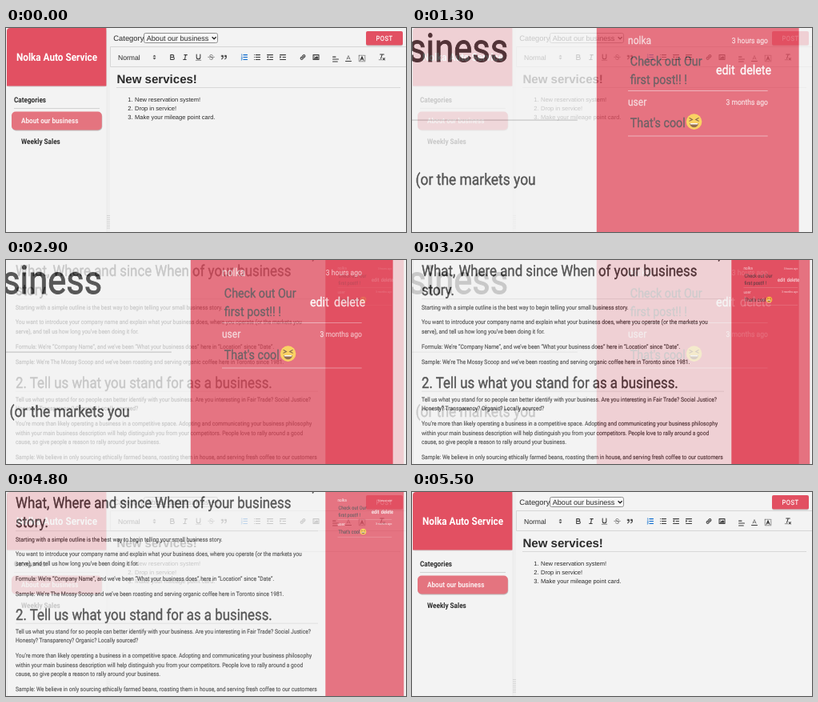
An HTML page for the animation above (5.72 s loop, 500 by 255 pixels).

```html
<!DOCTYPE html>
<html lang="en">
<head>
<meta charset="utf-8">
<title>Business page editor</title>
<style>
  html, body { margin: 0; width: 100%; height: 100%; overflow: hidden; background: #f3f3f3; }
  svg { display: block; width: 100vw; height: 100vh; color: #2b2b2b; }
  text { text-rendering: geometricPrecision; fill: currentColor; }
  .narrow { font-family: Roboto, sans-serif; stroke: currentColor; stroke-width: .02em; }
  .narrow[font-weight] { stroke: none; }
  .plain { font-family: "Liberation Sans", Arial, sans-serif; }
  .icon { fill: none; stroke: #3a3a3a; stroke-width: 1.8; stroke-linecap: round; stroke-linejoin: round; }
  .icon .solid { fill: #3a3a3a; stroke-width: 1; }
  .icon .thin { stroke-width: 1; }
  .icon.active { stroke: #06c; }
</style>
</head>
<body>
<svg id="stage" viewBox="0 0 500 255" preserveAspectRatio="none"></svg>
<script>
const RED = '#e25062', PAPER = '#f3f3f3';
const CONDENSED = 0.885;

const narrow = (x, y, size, str, attrs = '') =>
  `<text class="narrow" transform="translate(${x} ${y}) scale(${CONDENSED} 1)" font-size="${size}" ${attrs}>${str}</text>`;
const plain = (x, y, size, str, attrs = '') =>
  `<text class="plain" x="${x}" y="${y}" font-size="${size}" ${attrs}>${str}</text>`;
const rect = (x, y, w, h, fill, attrs = '') =>
  `<rect x="${x}" y="${y}" width="${w}" height="${h}" fill="${fill}" ${attrs}/>`;
const line = (d, stroke, width = 1) =>
  `<path d="${d}" fill="none" stroke="${stroke}" stroke-width="${width}"/>`;
const path = (d, cls = '') => `<path d="${d}" class="${cls}"/>`;
const icon = (cx, cy, body, cls = '') =>
  `<g class="icon ${cls}" transform="translate(${cx - 5.2} ${cy - 5.2}) scale(.58)">${body}</g>`;

const toolbar = [
  [185.5, path('M7 11l2 2.5 2-2.5zM7 7l2-2.5L11 7z', 'solid')],
  [208, path('M5 4H9.5a2.5 2.5 0 0 1 0 5H5zM5 9h5.5a2.5 2.5 0 0 1 0 5H5z')],
  [224, path('M7 4h6M5 14h6M8 14l2-10')],
  [240.5, path('M5 3v6a4 4 0 0 0 8 0V3') + path('M3.5 15.5h11', 'thin')],
  [256.5, path('M12.5 5.5C11 3 6 3 6 6c0 2.8 6.5 2.6 6.5 5.6 0 3.4-5.8 3-7.3.6', 'thin') + path('M2.5 8.7h13', 'thin')],
  [272.5, path('M4 5h3v3H4zM11 5h3v3h-3z', 'solid') + path('M7 8c0 4-3 5-3 5M14 8c0 4-3 5-3 5')],
  [298, path('M7 4h8M7 9h8M7 14h8') + path('M2.5 3.2l1-.7V6M2.4 8h1.8l-1.8 2.5h2M2.4 12.5h1.8l-1 1.4c1.4 0 1.2 1.9-.8 1.5', 'thin'), 'active'],
  [314, path('M6 4h9M6 9h9M6 14h9M3 4h0M3 9h0M3 14h0')],
  [330, path('M3 14h12M3 4h12M9 9h6') + path('M5 7v4L3 9z', 'solid')],
  [346, path('M3 14h12M3 4h12M9 9h6') + path('M3 7v4l2-2z', 'solid')],
  [371, path('M7 11l4-4M8 6.5l2-2a2.5 2.5 0 0 1 3.5 3.5l-2 2M10 11.5l-2 2A2.5 2.5 0 0 1 4.5 10l2-2')],
  [387.5, path('M3 4h12v10H3z') + path('M5 12v-1l2-2 1 1 3-3 2 2v3zM5.5 7h1', 'solid')],
  [412, path('M15 9H3M13 14H3M9 4H3'), '', 2.5],
  [428, path('M3 15h12') + path('M5.5 11L9 3l3.5 8M6.4 9h5.2', 'thin'), '', 1.5],
  [445, path('M5.5 13L9 5l3.5 8M6.4 10.5h5.2') +
        '<path class="thin" d="M2.5 2.5h13v13h-13z" stroke-dasharray="1 1.6"/>', '', 1.5],
  [470, path('M5 3h8M9.3 3L6.5 12M11 11l4 4M15 11l-4 4') + path('M2.5 14.5h6', 'thin')]
].map(([x, body, cls = '', dy = 0]) => icon(x, 36.5 + dy, body, cls)).join('');

const listItems = ['New reservation system!', 'Drop in service!', 'Make your mileage point card.']
  .map((item, i) => {
    const y = 92.4 + i * 10.6;
    return plain(158.5, y, 7.5, `${i + 1}.`, 'text-anchor="end"') + plain(161, y, 7.5, item);
  }).join('');

const bold = 'font-weight="700"';
const editor = `
  ${rect(0, 0, 500, 255, PAPER)}
  ${rect(1, 1.5, 125, 72, '#000', 'opacity=".15" rx="3"')}
  <path d="M1 72.5V4a4 4 0 0 1 4-4H125.5V72.5z" fill="${RED}"/>
  ${narrow(63.5, 40.5, 13.3, 'Nolka Auto Service', `${bold} text-anchor="middle" color="#fff"`)}
  ${narrow(10, 93.2, 9.25, 'Categories', bold)}
  ${line('M10 100.5H117', '#d2d2d2')}
  ${rect(7.5, 105.5, 112.8, 23, '#000', 'rx="5" opacity=".22"')}
  ${rect(7, 104.5, 112.8, 23, '#e4747f', 'rx="5"')}
  ${narrow(19, 119, 9.25, 'About our business', `${bold} color="#fbeff0"`)}
  ${narrow(19, 145, 9.25, 'Weekly Sales', bold)}
  ${rect(126, 0, 4, 255, '#efefef')}
  ${line('M126 0V255', '#e4e4e4', 0.6)}
  <path d="M127 234V251M129 234V251" stroke="#bbb" stroke-dasharray="1 1.6"/>
  ${plain(134.3, 16, 9.4, 'Category')}
  ${rect(172.5, 6.5, 92, 12, '#f7f7f7', 'rx="2" stroke="#777" stroke-width=".8"')}
  ${plain(175.8, 15.7, 9.05, 'About our business')}
  ${line('M257.6 11.2l2.5 2.6 2.5-2.6', '#222', 1.3)}
  ${rect(450, 5, 46, 17.5, '#000', 'rx="2" opacity=".2"')}
  ${rect(450, 4, 46, 17.5, RED, 'rx="2"')}
  ${narrow(473, 15.8, 8.6, 'POST', 'text-anchor="middle" letter-spacing=".5" color="#fff"')}
  ${line('M501 23.5H130.5V48.5H501', '#d0d0d0', 0.8)}
  ${plain(140, 39.5, 8.6, 'Normal')}
  ${toolbar}
  ${plain(138.5, 69, 15.05, 'New services!', bold)}
  ${line('M138 74.5H493', '#d2d2d2', 0.8)}
  ${listItems}`;

const paragraphs = [
  [61.9, 'Starting with a simple outline is the best way to begin telling your small business story.'],
  [79.9, 'You want to introduce your company name and explain what your business does, where you operate (or the markets you'],
  [91.5, 'serve), and tell us how long you’ve been doing it for.'],
  [111.2, 'Formula: We’re “Company Name”, and we’ve been “What your business does” here in “Location” since “Date”.'],
  [130.2, 'Sample: We’re The Mossy Scoop and we’ve been roasting and serving organic coffee here in Toronto since 1981.'],
  [176.5, 'Tell us what you stand for so people can better identify with your business. Are you interesting in Fair Trade? Social Justice?'],
  [187.9, 'Honesty? Transparency? Organic? Locally sourced?'],
  [207.2, 'You’re more than likely operating a business in a competitive space. Adopting and communicating your business philosophy'],
  [218.6, 'within your main business description will help distinguish you from your competitors. People love to rally around a good'],
  [230, 'cause, so give people a reason to rally around your business.'],
  [249, 'Sample: We believe in only sourcing ethically farmed beans, roasting them in house, and serving fresh coffee to our customers']
].map(([y, str]) => narrow(12, y, 7.635, str)).join('');

const comment = (y, user, age) =>
  narrow(414.5, y, 5.25, user, 'color="#f6d5d9"') +
  narrow(482.3, y - 0.3, 3.75, age, 'text-anchor="end" color="#f9dde0"');
const note = (y, str) => narrow(415.6, y, 6.25, str, 'color="#473a3f"');
const button = (x, str) => narrow(x, 26.6, 6.28, str, 'color="#fff"');

const laugh = `<g transform="translate(446.5 49.5)" fill="none" stroke="#6b4420" stroke-width=".4" stroke-linecap="round">
  <circle r="3.8" fill="#fcc93c" stroke="none"/>
  <path d="M-2.2-1.8l1.4.8-1.4.7M2.2-1.8l-1.4.8 1.4.7"/>
  <path d="M-2.1.7H2.1A2.1 2.1 0 0 1-2.1.7z" fill="#7a4a22" stroke="none"/>
  <path d="M-1.6 1H1.6" stroke="#fff" stroke-width=".6"/></g>`;

const article = `
  ${rect(0, 0, 540, 255, PAPER)}
  ${line('M1.5 0V255', '#e4e4e4', 0.8)}
  ${narrow(382.5, -1, 19, ',')}
  ${narrow(12, 20.2, 19.04, 'What, Where and since When of your business')}
  ${narrow(12, 44.2, 19.04, 'story.')}
  ${narrow(12, 159.5, 19.04, '2. Tell us what you stand for as a business.')}
  ${line('M12 48.7H390M12 164.2H390', '#bbb', 0.45)}
  ${paragraphs}
  ${rect(399.3, -5, 98, 265, RED)}
  ${comment(11.8, 'nolka', '3 hours ago')}
  ${note(22.3, 'Check out Our')}${note(31.2, 'first post!! !')}
  ${button(457.1, 'edit')}${button(468.8, 'delete')}
  ${comment(41.6, 'user', '3 months ago')}
  ${note(52, 'That\'s cool')}${laugh}
  ${line('M414.5 34.5H482.2M414.5 56.4H482.2', '#eda3ad', 0.4)}`;

document.getElementById('stage').innerHTML = `
  <defs><g id="editor">${editor}</g><g id="article">${article}</g></defs>
  <use href="#editor"/>
  <g class="fade"><use href="#article" transform="translate(-799.4 -10.6) scale(2.58)"/></g>
  <g class="fade"><use href="#article"/></g>
  <g class="fade"><use href="#editor"/></g>`;

// Each scene fades in over the previous one in 100 ms steps.
const LOOP = 5720, STARTS = [1000, 2900, 4800];
const layers = document.querySelectorAll('.fade');
const opacityAt = age => age < 0 ? 0 : Math.min(1, 0.22 + 0.19 * Math.floor(age / 100));
const origin = performance.now();

function draw() {
  const t = (performance.now() - origin) % LOOP;
  layers.forEach((layer, i) => layer.setAttribute('opacity', opacityAt(t - STARTS[i])));
  requestAnimationFrame(draw);
}
draw();
</script>
</body>
</html>
```
